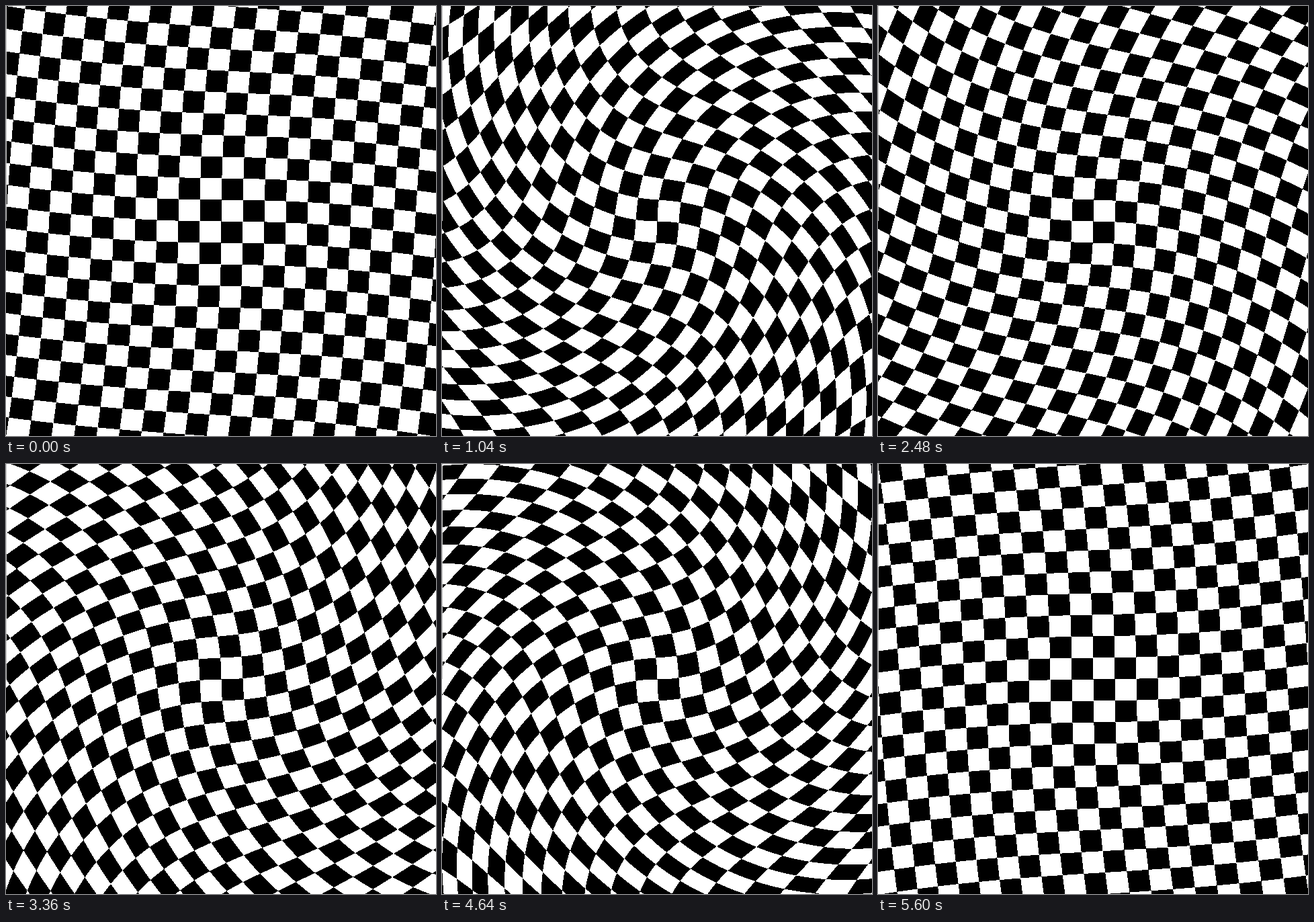
An HTML page with a canvas that plays this animation: 640 px wide and 640 px high, repeating every 5.68 s.

```html
<!DOCTYPE html>
<html lang="en">
<head>
<meta charset="utf-8">
<title>Twisting checkerboard</title>
<style>
  html, body { margin: 0; width: 100%; height: 100%; overflow: hidden; background: #fff; }
  canvas { display: block; }
</style>
</head>
<body>
<canvas id="stage" width="640" height="640"></canvas>
<script>
const SIZE = 640, HALF = SIZE / 2, CELL = 32;
const STEP_MS = 80, STEPS = 71;
const MAX_TWIST = Math.PI / 4; // rotation at the middle of each edge
const BLACK = 0xff000000, WHITE = 0xffffffff, GREY = 0xffcccccc;

const ctx = document.getElementById('stage').getContext('2d');
const image = ctx.createImageData(SIZE, SIZE);
const pixels = new Uint32Array(image.data.buffer);

// The rotation of each point grows linearly with its distance from the centre.
function draw(step) {
  const twist = MAX_TWIST * Math.sin((step + 1) / (STEPS + 1) * 2 * Math.PI) / HALF;
  let i = 0;
  for (let py = 0; py < SIZE; py++) {
    const y = py - HALF;
    for (let px = 0; px < SIZE; px++) {
      const x = px - HALF;
      const angle = twist * Math.sqrt(x * x + y * y);
      const c = Math.cos(angle), s = Math.sin(angle);
      const col = Math.floor((x * c + y * s) / CELL);
      const row = Math.floor((y * c - x * s) / CELL);
      pixels[i++] = (col + row) & 1 ? WHITE : BLACK;
    }
  }
  // Thin rule on the upper half of the left edge.
  for (let py = 0; py < HALF; py++) pixels[py * SIZE] = GREY;
  ctx.putImageData(image, 0, 0);
}

const start = performance.now();
let shown = -1;

function tick() {
  const step = Math.floor((performance.now() - start) / STEP_MS) % STEPS;
  if (step !== shown) draw(shown = step);
  requestAnimationFrame(tick);
}
tick();
</script>
</body>
</html>
```
